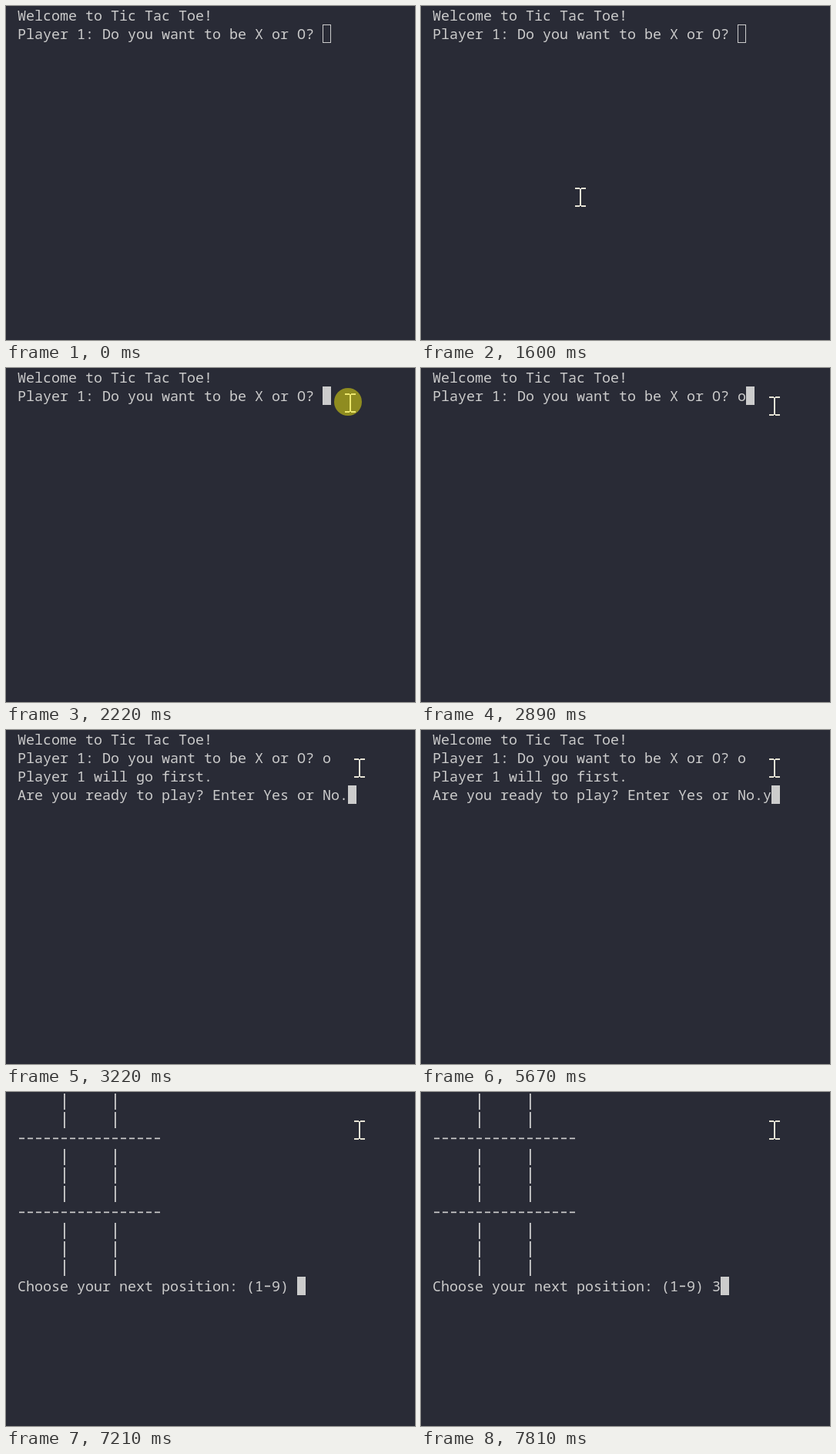
Recreate the animation shown at these times as an HTML page with a canvas. Size 531x434 px, loop 8000 ms.

```html
<!DOCTYPE html>
<html lang="en">
<head>
<meta charset="utf-8">
<title>Tic Tac Toe terminal</title>
<style>
html, body { margin: 0; width: 100%; height: 100%; overflow: hidden; background: #292b36; }
canvas { display: block; }
</style>
</head>
<body>
<canvas id="stage" width="531" height="434"></canvas>
<script>
const ctx = document.getElementById('stage').getContext('2d');
const LOOP = 8000;
const CELL_W = 11, CELL_H = 24, LEFT = 15, BASELINE = 19;
const BACK = '#292b36', INK = '#cccccc', POINTER = '#e6e3d5';

const ask = 'Player 1: Do you want to be X or O? ';
const intro = ['Welcome to Tic Tac Toe!', ask];
const ready = [intro[0], ask + 'o', 'Player 1 will go first.',
  'Are you ready to play? Enter Yes or No.'];
const bars = '     |     |';
const rule = '-'.repeat(17);

function board(numbered) {
  const label = n => numbered ? ` ${n}   |  ${n + 1}  |  ${n + 2}` : bars;
  return [label(7), bars, rule, bars, label(4), bars, rule, bars, label(1), bars];
}

const choose = [...board(false), 'Choose your next position: (1-9) '];
const typed = (lines, key) => [...lines.slice(0, -1), lines[lines.length - 1] + key];

// The text cursor stands at the end of the last line.
const screens = [
  [0, intro],
  [2890, typed(intro, 'o')],
  [3220, ready],
  [5670, typed(ready, 'y')],
  [6150, [...board(true), '']],
  [7210, choose],
  [7810, typed(choose, '3')]
];

// Time, left and top of the mouse pointer; no position means out of view.
const pointerPath = [
  [0], [70, 501, 237], [150],
  [1600, 200, 236], [1690, 180, 240], [1750, 178, 237], [1820, 192, 218],
  [1880, 226, 186], [1950, 284, 138], [2010, 350, 88], [2080, 408, 49],
  [2150, 437, 32], [2220, 440, 33], [2280, 446, 35], [2350, 452, 37]
];
const PRESS = 2150, RELEASE = 2280;

const latest = (steps, t) => steps.filter(s => s[0] <= t).pop();

function drawChar(ch, x, y) {
  if (ch === '|') ctx.fillRect(x + 5, y + 2, 1.8, 21);
  else if (ch === '-') ctx.fillRect(x + 2, y + 11.5, 7, 1.7);
  else if (ch !== ' ') ctx.fillText(ch, x, y + BASELINE);
}

function drawScreen(lines, focused) {
  ctx.fillStyle = ctx.strokeStyle = INK;
  lines.forEach((line, row) => {
    [...line].forEach((ch, col) => drawChar(ch, LEFT + col * CELL_W, row * CELL_H));
  });
  const row = lines.length - 1;
  const x = LEFT + lines[row].length * CELL_W, y = row * CELL_H;
  if (focused) ctx.fillRect(x, y, CELL_W, CELL_H);
  else ctx.strokeRect(x + 0.5, y + 0.5, CELL_W - 1, CELL_H - 1);
}

function drawPointer(x, y) {
  ctx.fillStyle = POINTER;
  for (const top of [y, y + 23]) {
    ctx.fillRect(x, top, 6, 2);
    ctx.fillRect(x + 8, top, 6, 2);
  }
  ctx.fillRect(x + 6, y + 1, 2, 23);
}

function drawClick() {
  ctx.fillStyle = 'rgba(245, 238, 10, 0.5)';
  ctx.beginPath();
  ctx.arc(444, 44, 18, 0, Math.PI * 2);
  ctx.fill();
}

function draw(t) {
  ctx.fillStyle = BACK;
  ctx.fillRect(0, 0, 531, 434);
  ctx.font = '18.33px "Noto Sans Mono", monospace';
  drawScreen(latest(screens, t)[1], t >= PRESS);
  const [, x, y] = latest(pointerPath, t);
  if (x !== undefined) drawPointer(x, y);
  if (t >= PRESS && t < RELEASE) drawClick();
}

let start;
function tick(now) {
  start ??= now;
  draw((now - start) % LOOP);
  requestAnimationFrame(tick);
}
draw(0);
requestAnimationFrame(tick);
</script>
</body>
</html>
```
